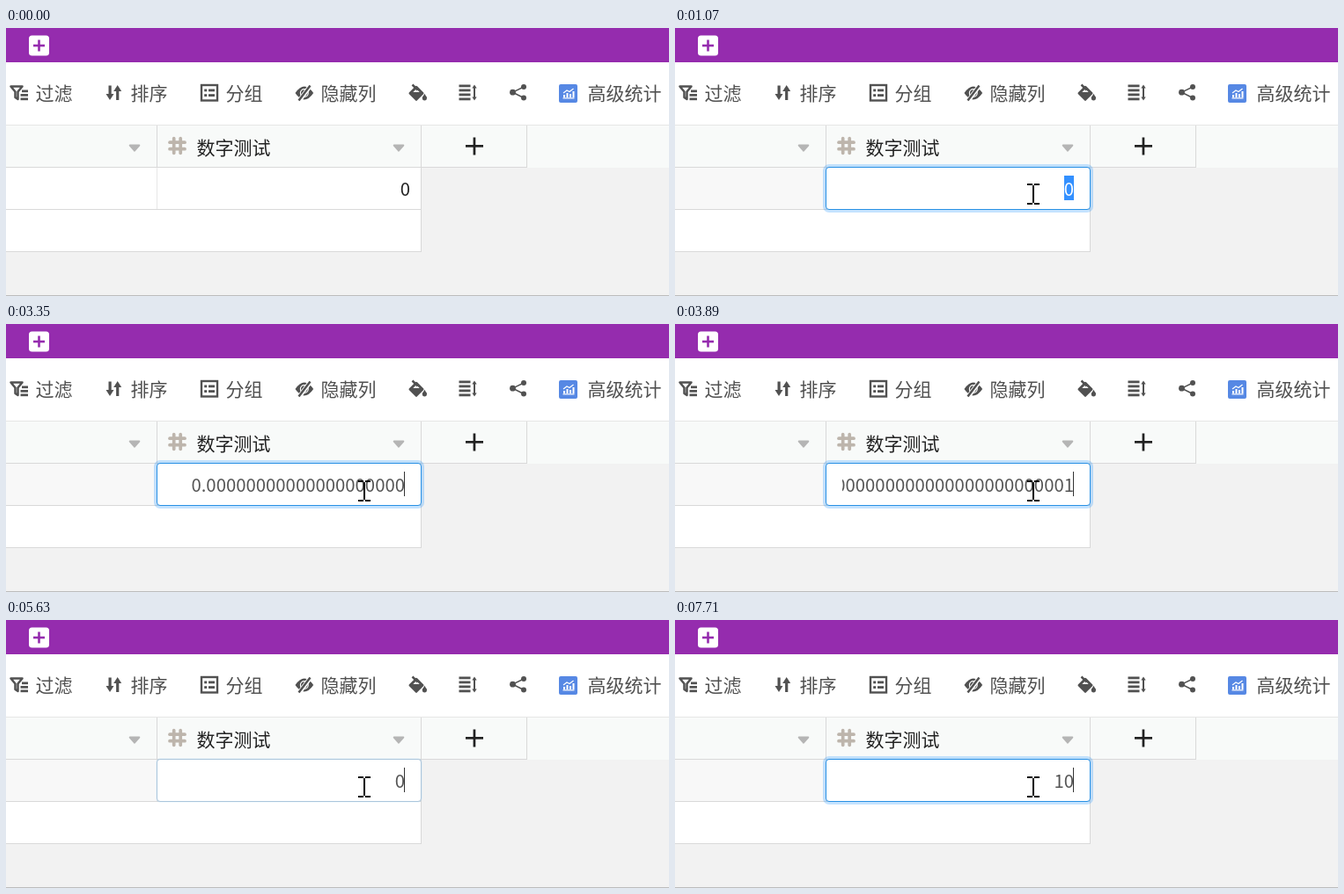
Write an HTML page with a canvas that moves like this. It is 753 px wide and 305 px high and loops after 8000 ms.

```html
<!DOCTYPE html>
<html lang="zh-CN">
<head>
<meta charset="utf-8">
<title>数字测试</title>
<style>
  html, body { margin: 0; width: 100%; height: 100%; overflow: hidden; background: #f2f2f2; }
  canvas { display: block; }
</style>
</head>
<body>
<canvas id="stage" width="753" height="305"></canvas>
<script>
const ctx = document.getElementById('stage').getContext('2d');
const LOOP = 8000;
const FONT = '"Noto Sans CJK SC", "Noto Sans CJK", sans-serif';
const ICON = '#515151';

function rect(color, x, y, w, h) {
  ctx.fillStyle = color;
  ctx.fillRect(x, y, w, h);
}

function roundRect(x, y, w, h, r) {
  ctx.beginPath();
  ctx.roundRect(x, y, w, h, r);
}

function trace(points, close) {
  ctx.beginPath();
  points.forEach(([x, y], i) => i ? ctx.lineTo(x, y) : ctx.moveTo(x, y));
  if (close) ctx.closePath();
}

function shape(color, ...points) {
  trace(points, true);
  ctx.fillStyle = color;
  ctx.fill();
}

function line(color, width, ...points) {
  trace(points, false);
  ctx.strokeStyle = color;
  ctx.lineWidth = width;
  ctx.stroke();
}

function dot(color, x, y, r) {
  ctx.beginPath();
  ctx.arc(x, y, r, 0, Math.PI * 2);
  ctx.fillStyle = color;
  ctx.fill();
}

function text(str, x, y, color, size = 21, align = 'left') {
  ctx.font = `${size}px ${FONT}`;
  ctx.textAlign = align;
  ctx.fillStyle = color;
  ctx.fillText(str, x, y);
}

const digits = (str, right, color) => text(str, right, 191, color, 20.33, 'right');
const smooth = p => p * p * (3 - 2 * p);
const mix = (a, b, p) => `rgb(${a.map((v, i) => Math.round(v + (b[i] - v) * p)).join(',')})`;

function filterIcon() {
  ctx.lineJoin = 'round';
  trace([[5.5, 66.5], [18.5, 66.5], [13.5, 72.5], [13.5, 81], [10.5, 79], [10.5, 72.5]], true);
  ctx.strokeStyle = ICON;
  ctx.lineWidth = 2.5;
  ctx.stroke();
  ctx.lineJoin = 'miter';
  rect(ICON, 18, 70.5, 7, 2.7);
  rect(ICON, 16.5, 75, 8.5, 2.7);
  rect(ICON, 16.5, 79.5, 8.5, 2.7);
}

function sortIcon() {
  rect(ICON, 116.5, 65.5, 3.2, 12);
  shape(ICON, [113.5, 75], [122.5, 75], [118, 82]);
  rect(ICON, 125.1, 70, 3.2, 12);
  shape(ICON, [122.2, 72], [131.2, 72], [126.7, 65]);
}

function groupIcon() {
  ctx.strokeStyle = ICON;
  ctx.lineWidth = 2.4;
  ctx.strokeRect(222, 65, 18, 17.5);
  for (const y of [69.5, 75.2]) {
    rect(ICON, 225.2, y, 3, 2.8);
    rect(ICON, 230, y, 7, 2.8);
  }
}

function eyeIcon() {
  ctx.beginPath();
  ctx.moveTo(328.5, 74);
  ctx.quadraticCurveTo(338.8, 59, 349.2, 74);
  ctx.quadraticCurveTo(338.8, 89, 328.5, 74);
  ctx.fillStyle = ICON;
  ctx.fill();
  ctx.beginPath();
  ctx.arc(338.8, 74, 4.4, 0, Math.PI * 2);
  ctx.strokeStyle = '#fff';
  ctx.lineWidth = 1.2;
  ctx.stroke();
  line('#fff', 5, [332.5, 83.5], [346.5, 64.5]);
  line(ICON, 2.5, [332.5, 82.5], [345.5, 65.5]);
}

function bucketIcon() {
  trace([[466, 67.3], [473, 74.3], [466, 81.3], [459, 74.3]], true);
  ctx.lineJoin = 'round';
  ctx.strokeStyle = ICON;
  ctx.lineWidth = 3;
  ctx.stroke();
  ctx.lineJoin = 'miter';
  shape(ICON, [458.5, 73], [473.5, 73], [466, 82]);
  line(ICON, 2.5, [461.5, 64.5], [467.5, 70.5]);
  dot(ICON, 475.4, 79.8, 2.6);
  shape(ICON, [475.4, 74.8], [477.8, 79], [473, 79]);
}

function rowHeightIcon() {
  for (const y of [64.5, 69.5, 74.5, 79.5]) rect(ICON, 514.5, y, 13, 2.8);
  rect(ICON, 531, 67, 2, 13);
  shape(ICON, [529.3, 68.5], [534.7, 68.5], [532, 64.5]);
  shape(ICON, [529.3, 78.5], [534.7, 78.5], [532, 82.5]);
}

function shareIcon() {
  line(ICON, 1.5, [588, 67], [575.5, 73.2], [588, 79.5]);
  dot(ICON, 575.5, 73.2, 3.4);
  dot(ICON, 588, 67, 3);
  dot(ICON, 588, 79.5, 3);
}

function statsIcon() {
  roundRect(628, 64, 21, 21, 2);
  ctx.fillStyle = '#5688e4';
  ctx.fill();
  [[633, 3], [636.5, 5], [640, 4], [643.5, 7]].forEach(([x, h]) => rect('#fff', x, 79 - h, 2, h));
  rect('#fff', 632.5, 79.3, 13, 1.2);
  line('#fff', 1.2, [633, 74], [637, 71], [640, 72.5], [644.5, 69]);
}

function toolbar() {
  rect('#952cae', 0, 0, 753, 39);
  roundRect(26, 8.5, 23, 23, 3.5);
  ctx.fillStyle = '#fff';
  ctx.fill();
  rect('#952cae', 31, 18.7, 13, 2.6);
  rect('#952cae', 36.2, 13.5, 2.6, 13);

  rect('#fff', 0, 39, 753, 71);
  rect('#e6e6e6', 0, 110, 753, 1);
  filterIcon();
  sortIcon();
  groupIcon();
  eyeIcon();
  bucketIcon();
  rowHeightIcon();
  shareIcon();
  statsIcon();
  [['过滤', 33.5], ['排序', 141.5], ['分组', 249.5], ['隐藏列', 357.5], ['高级统计', 660.5]]
    .forEach(([label, x]) => text(label, x, 81.5, '#505050'));
}

function dropArrow(x) {
  ctx.lineJoin = 'round';
  trace([[x - 5.3, 133.5], [x + 5.3, 133.5], [x, 139.7]], true);
  ctx.fillStyle = ctx.strokeStyle = '#b5b5b5';
  ctx.lineWidth = 2;
  ctx.fill();
  ctx.stroke();
  ctx.lineJoin = 'miter';
}

function table(hover) {
  rect('#f2f2f2', 0, 159, 753, 146);
  rect('#f8faf9', 0, 111, 753, 48);
  rect(hover ? '#f8f8f8' : '#fff', 0, 159, 471, 47);
  rect('#fff', 0, 207, 471, 47);

  const border = '#d9d9d9';
  rect(border, 0, 158, 592, 1);
  rect(border, 0, 206, 472, 1);
  rect(border, 0, 254, 472, 1);
  rect(border, 171, 111, 1, 47);
  rect('#e6e6e6', 171, 159, 1, 47);
  rect(border, 471, 111, 1, 144);
  rect(border, 591, 111, 1, 48);
  rect('#bcbcbc', 0, 304, 753, 1);

  const hash = '#bdb5ac';
  ctx.lineCap = 'round';
  for (const d of [0, 7.5]) {
    line(hash, 3.7, [186, 130.2 + d], [203, 130.2 + d]);
    line(hash, 3.7, [190.7 + d, 125.7], [190.7 + d, 142.3]);
  }
  ctx.lineCap = 'butt';
  text('数字测试', 216.5, 143.5, '#222');
  dropArrow(146);
  dropArrow(446);
  rect('#222', 522, 133, 20, 2.7);
  rect('#222', 530.6, 124.5, 2.7, 20);
}

function selectedCell() {
  rect('#fff', 172, 159, 299, 47);
  const blue = '#66b0e8';
  rect(blue, 171, 159, 301, 2);
  rect(blue, 171, 205, 301, 3);
  rect(blue, 171, 159, 3, 48);
  rect(blue, 469, 159, 3, 48);
  rect('#fff', 464, 200, 12, 12);
  rect(blue, 465, 201, 11, 10.5);
  digits('0', 459, '#222');
}

function editor(value, { focus, selected, caret }) {
  const spread = 3 * focus;
  roundRect(171 - spread, 158 - spread, 301 + 2 * spread, 49 + 2 * spread, 4 + spread);
  ctx.fillStyle = `rgba(24,144,255,${0.25 * focus})`;
  ctx.fill();
  roundRect(171.5, 158.5, 300, 48, 3.5);
  ctx.fillStyle = '#fff';
  ctx.fill();
  ctx.strokeStyle = mix([217, 217, 217], [40, 144, 228], focus);
  ctx.lineWidth = 1;
  ctx.stroke();

  ctx.save();
  ctx.beginPath();
  ctx.rect(190, 160, 264, 45);
  ctx.clip();
  if (selected) rect('#3390ff', 442, 168, 11, 28);
  digits(value, 453, selected ? '#fff' : '#555');
  ctx.restore();
  if (caret) rect('#333', 452, 168, 1, 28);
}

function arrowCursor(x, y) {
  const outline = [[0, 0], [0, 23.5], [5.5, 18.3], [9.2, 26.5], [13, 25], [9.5, 17], [17, 17]];
  trace(outline.map(([dx, dy]) => [x + 0.5 + dx, y + 1.2 + dy]), true);
  ctx.fillStyle = '#fff';
  ctx.fill();
  ctx.strokeStyle = '#222';
  ctx.lineWidth = 1;
  ctx.stroke();
}

function beamCursor(y) {
  rect('#000', 406, y + 2, 2, 20);
  for (const dy of [0, 22]) {
    rect('#000', 400, y + dy, 6, 2);
    rect('#000', 408, y + dy, 6, 2);
  }
}

function typedValue(t) {
  if (t < 1990) return '0';
  if (t < 2210) return '0.';
  if (t < 2740) return '0.0';
  if (t < 4430) {
    const step = Math.min(11, Math.floor((t - 2740) / 67.5));
    return '0.' + '0'.repeat(2 + 2 * step) + (t >= 3890 ? '1' : '');
  }
  if (t < 6970) return '0';
  if (t < 7380) return '';
  return t < 7710 ? '1' : '10';
}

function mouse(t) {
  const p = Math.min(8, Math.floor((t - 270) / 66.25)) / 8;
  const rest = (1 - p) ** 2;
  return [404 + 168 * rest, 186 + 108 * rest];
}

function draw(t) {
  const firstEdit = t >= 1000 && t < 4430;
  const secondEdit = t >= 5560;
  const [mx, my] = mouse(t);
  toolbar();
  table(t >= 270 && mx < 472 && my < 207);

  if (firstEdit || secondEdit) {
    const step = firstEdit ? (t < 1070 ? 2 : 3) : Math.min(3, Math.floor((t - 5560) / 70));
    const selected = firstEdit && t < 1860;
    const blinkOff = (t >= 6170 && t < 6700) || (t >= 7250 && t < 7380);
    editor(typedValue(t), { focus: smooth(step / 3), selected, caret: !selected && !blinkOff });
    beamCursor(t < 1860 ? 177 : 178);
  } else {
    if (t >= 940) selectedCell();
    else digits('0', 459, '#222');
    if (t >= 270) arrowCursor(mx, t >= 4430 ? 187 : my);
  }
}

const start = performance.now();
function frame() {
  draw((performance.now() - start) % LOOP);
  requestAnimationFrame(frame);
}
frame();
</script>
</body>
</html>
```
